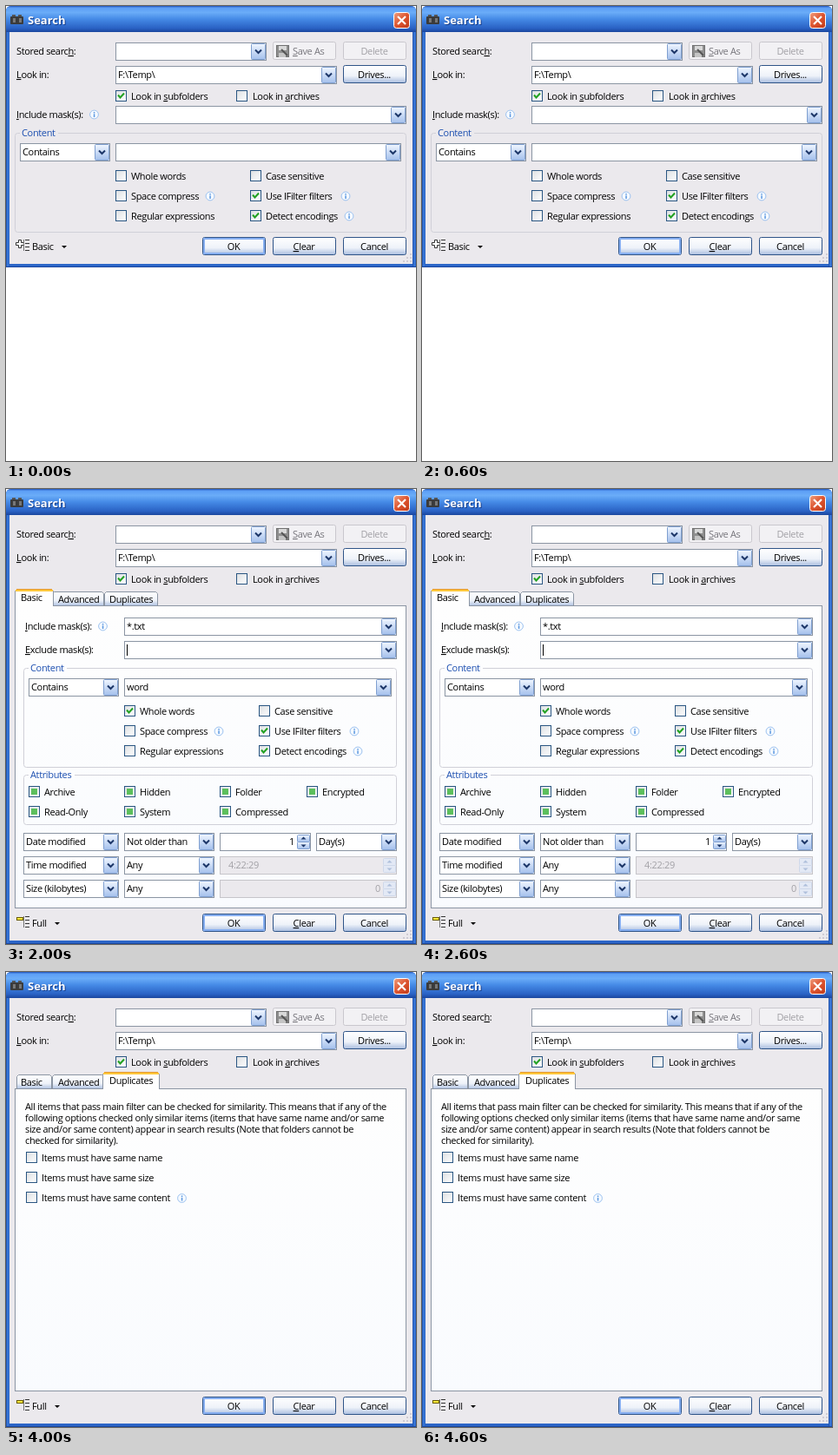
An HTML page for the animation above (5 s loop, 472x524 px).

```html
<!DOCTYPE html>
<html lang="en">
<head>
<meta charset="utf-8">
<title>Search dialog</title>
<style>
html, body { margin: 0; width: 100%; height: 100%; overflow: hidden; background: #fff; }
svg { display: block; width: 472px; height: 524px; }
text { font: 11px "Open Sans", "Noto Sans", sans-serif; letter-spacing: -.35px; white-space: pre; }
.title { font-size: 13px; font-weight: 700; letter-spacing: 0; }
.u { text-decoration: underline; }
</style>
</head>
<body>
<svg viewBox="0 0 472 524">
  <defs>
    <linearGradient id="bar" x2="0" y2="1">
      <stop offset="0" stop-color="#1d50b8"/><stop offset=".07" stop-color="#5c9ef5"/>
      <stop offset=".25" stop-color="#6aacf8"/><stop offset=".5" stop-color="#458ae6"/>
      <stop offset=".85" stop-color="#2a62c4"/><stop offset="1" stop-color="#1a469e"/>
    </linearGradient>
    <linearGradient id="side"><stop stop-color="#1a469e"/><stop offset=".5" stop-color="#3f82e4"/><stop offset="1" stop-color="#2258b8"/></linearGradient>
    <linearGradient id="btn" x2="0" y2="1"><stop stop-color="#fff"/><stop offset=".6" stop-color="#eef2f9"/><stop offset="1" stop-color="#a9bddf"/></linearGradient>
    <linearGradient id="drop" x2="0" y2="1"><stop stop-color="#f0f6ff"/><stop offset="1" stop-color="#a4c0ec"/></linearGradient>
    <linearGradient id="box" x2="1" y2="1"><stop stop-color="#dcdfe2"/><stop offset="1" stop-color="#fff"/></linearGradient>
    <linearGradient id="red" x2="1" y2="1"><stop stop-color="#f0a080"/><stop offset=".5" stop-color="#dd5530"/><stop offset="1" stop-color="#c03a18"/></linearGradient>
    <linearGradient id="page" x2="0" y2="1"><stop stop-color="#fefefe"/><stop offset="1" stop-color="#f9fbfe"/></linearGradient>
  </defs>
  <g id="stage"></g>
</svg>
<script>
const INK = '#000', GREY = '#a2a1a6', EDGE = '#8b95a3', FACE = '#ebe9ed';

// Basic shapes
const rect = (x, y, w, h, fill, line, rx = 0) => line
  ? `<rect x="${x + .5}" y="${y + .5}" width="${w - 1}" height="${h - 1}" fill="${fill}" stroke="${line}" rx="${rx}"/>`
  : `<rect x="${x}" y="${y}" width="${w}" height="${h}" fill="${fill}" rx="${rx}"/>`;
const path = (d, line, width = 1, fill = 'none') =>
  `<path d="${d}" stroke="${line}" stroke-width="${width}" fill="${fill}"/>`;
// An underscore marks the access key
const text = (x, y, s, fill = INK, anchor = 'start', cls = '') =>
  `<text x="${x}" y="${y}" fill="${fill}" text-anchor="${anchor}" class="${cls}">${s.replace(/_(.)/, '<tspan class="u">$1</tspan>')}</text>`;

// Controls
const arrow = (x, y) => path(`M${x} ${y}h6l-3 3z`, 'none', 0, INK);

function combo(x, y, right, label = '', off = false) {
  const bx = right - 18, ink = off ? '#b9c4d8' : '#1c3668';
  return rect(x, y, right - x, 21, off ? FACE : '#fff', off ? '#c6c5ca' : EDGE) +
    text(x + 3, y + 14, label, off ? GREY : INK) +
    rect(bx, y + 1, 17, 19, off ? '#e3e7f0' : 'url(#drop)', off ? '#d0d6e2' : '#7f9fd0', 1) +
    path(`M${bx + 5} ${y + 8.5}l3.5 3.5l3.5 -3.5`, ink, 2);
}

function spin(x, y, right, label, off, left) {
  const bx = right - 16, ink = off ? '#afc0dc' : '#1c3668';
  const half = (dy, d) => rect(bx, y + dy, 15, 9, off ? '#e3e9f5' : 'url(#drop)', off ? '#ced8ea' : '#7f9fd0', 1) +
    path(`M${bx + 4.5} ${y + dy + 4.5 + d}h6l-3 ${-3 * d}z`, 'none', 0, ink);
  return rect(x, y, right - x, 21, off ? FACE : '#fff', off ? '#c6c5ca' : EDGE) +
    text(left ? x + 10 : right - 19, y + 14, label, off ? GREY : INK, left ? 'start' : 'end') +
    half(2, 1) + half(10, -1);
}

function check(x, y, label, mark, gap = 18) {
  const marks = {
    on: path(`M${x + 3} ${y + 5.5}l2.5 3l4.5 -5`, '#21a121', 2),
    some: rect(x + 3, y + 3, 7, 7, '#5cbf5c')
  };
  return rect(x, y, 13, 13, 'url(#box)', '#2a5682') + (marks[mark] || '') + text(x + gap, y + 11, label);
}

function button(x, y, label, kind) {
  const off = kind === 'off';
  return rect(x, y, 73, 21, off ? '#f2f1f4' : 'url(#btn)', off ? '#c9c7cd' : '#2f5488', 2) +
    (kind === 'main' ? `<rect x="${x + 2}" y="${y + 2}" width="69" height="17" fill="none" stroke="#86aef0" stroke-width="2"/>` : '') +
    text(x + 36, y + 15, label, off ? GREY : INK, 'middle');
}

const info = (x, y) => `<circle cx="${x}" cy="${y}" r="4.9" fill="#f6faff" stroke="#9cc2f0"/>` +
  rect(x - .7, y - 3, 1.5, 1.5, '#5b98e0') + rect(x - .7, y - .7, 1.5, 3.7, '#5b98e0');

const group = (y, x, right, h, label, w, bg) => rect(x, y, right - x, h, 'none', '#d0d0d8', 3) +
  rect(x + 6, y - 4, w, 9, bg) + text(x + 8, y + 4, label, '#1c4fb0');

const contentChecks = (x, y, whole) =>
  check(x, y, 'Whole words', whole) + check(x + 155, y, 'Case sensitive') +
  check(x, y + 23, 'Space compress') + check(x + 155, y + 23, 'Use IFilter filters', 'on') +
  check(x, y + 46, 'Regular expressions') + check(x + 155, y + 46, 'Detect encodings', 'on');

function content(x, y, right, filled, bg) {
  return group(y, x, right, 115, 'Content', 44, bg) +
    combo(x + 6, y + 12, x + 110, 'Contains') + combo(x + 116, y + 12, right - 6, filled ? 'word' : '') +
    contentChecks(x + 116, y + 43, filled && 'on') +
    info(x + 225, y + 73) + info(x + 381, y + 73) + info(x + 385, y + 96);
}

const include = (x, y, right, label) => text(x + 2, y + 14, '_Include mask(s):') +
  info(x + 91.5, y + 10) + combo(x + 116, y, right, label);

// Masks, content, attributes and date rows, shared by the larger layouts
function filters(x, y, right, filled) {
  const bg = filled ? '#fdfdfe' : FACE;
  const names = [['Archive', 0, 0], ['Hidden', 110, 0], ['Folder', 220, 0], ['Encrypted', 320, 0],
    ['Read-Only', 0, 23], ['System', 110, 23], ['Compressed', 220, 23]];
  const rows = ['Date modified', 'Time modified', 'Size (kilobytes)'].map((s, i) =>
    combo(x, y + 248 + 27 * i, x + 110, s) +
    combo(x + 116, y + 248 + 27 * i, x + 220, filled && !i ? 'Not older than' : 'Any'));
  return include(x, y, right, filled ? '*.txt' : '') +
    text(x + 2, y + 41, '_Exclude mask(s):') + combo(x + 116, y + 27, right) +
    (filled ? rect(x + 119, y + 31, 1, 13, INK) : '') +
    content(x, y + 58, right, filled, bg) +
    group(y + 181, x, right, 58, 'Attributes', 53, bg) +
    names.map(([s, dx, dy]) => check(x + 6 + dx, y + 194 + dy, s, 'some')).join('') +
    rows.join('') +
    (filled ? spin(x + 226, y + 248, 351, '1') + combo(357, y + 248, right, 'Day(s)')
      : combo(x + 226, y + 248, right, '24.04.2009', true)) +
    spin(x + 226, y + 275, right, filled ? '4:22:29' : '4:25:27', true, true) +
    spin(x + 226, y + 302, right, '0', true);
}

// Window parts
function frame(h) {
  return path(`M0 ${h}V6Q0 0 6 0H466Q472 0 472 6V${h}z`, 'none', 0, '#2c66c8') +
    path('M0 30V6Q0 0 6 0H466Q472 0 472 6V30z', 'none', 0, 'url(#bar)') +
    rect(0, 30, 4, h - 30, 'url(#side)') + rect(468, 30, 4, h - 30, 'url(#side)') +
    rect(0, h - 1, 472, 1, '#1a469e') + rect(4, 30, 464, h - 34, FACE) +
    rect(7, 10, 4, 4, '#555') + rect(14, 10, 4, 4, '#555') +
    rect(5, 12, 15, 9, '#3b3b3b', '', 1) + rect(8, 14, 3, 5, '#777') + rect(15, 14, 3, 5, '#777') +
    text(26, 22, 'Search', '#173f8c', 'start', 'title') + text(25, 21, 'Search', '#fff', 'start', 'title') +
    rect(446, 7, 19, 19, 'url(#red)', '#fff', 3) +
    path('M451 12l9 9M460 12l-9 9', '#fff', 2.2) +
    [[0, 0], [4, 0], [8, 0], [4, -4], [8, -4], [8, -8]].map(([a, b]) =>
      rect(457 + a, h - 8 + b, 2, 2, '#cfccd4')).join('');
}

const header = () => text(12, 56, 'Stored searc_h:') + combo(126, 42, 300) +
  rect(307, 41, 73, 21, '#f2f1f4', '#c9c7cd', 2) +
  rect(311, 45, 15, 14, '#8f8f8f', '#707070') + rect(314, 46, 9, 5, '#d9d9d9') + rect(314, 54, 8, 5, '#c4c4c4') +
  path('M317 50l7 7', '#555', 2) + text(330, 56, '_Save As', '#77767c') +
  button(388, 41, 'Delete', 'off') +
  text(12, 83, '_Look in:') + combo(126, 69, 381, 'F:\\Temp\\') +
  button(388, 68, 'Drives...') +
  check(126, 97, 'Look in _subfolders', 'on') + check(265, 97, 'Look in _archives', '', 19);

function footer(y, mode, arrowX) {
  const full = mode === 'Full', fill = mode === 'Basic' ? '#fff' : '#ffe83c';
  const icon = full
    ? rect(12, y + 4, 8, 4, '#ffe83c', '#6a5c00')
    : path(`M14.5 ${y + 3.5}h3v3h3v3h-3v3h-3v-3h-3v-3h3z`, '#333', 1, fill);
  const lines = [3, 7, 11, 15].map(d => rect(22, y + d, 5, 1, '#333')).join('');
  return icon + rect(20, y + 3, 1, 13, '#777') + lines +
    text(30, y + 15, mode) + arrow(arrowX, y + 10) +
    button(226, y, 'OK', 'main') + button(307, y, '_Clear') + button(388, y, 'Cancel');
}

function tabs(active) {
  const list = [['Basic', 12, 53, 17], ['Advanced', 53, 113, 60], ['Duplicates', 113, 175, 119]];
  const draw = ([label, x, right, tx], i) => {
    const on = i === active, y = on ? 115 : 118, a = on ? x - 2 : x, b = on ? right + 2 : right;
    return path(`M${a + .5} 135V${y + 2.5}l2 -2H${b - 2.5}l2 2V135`, EDGE, 1, on ? '#fefefe' : 'url(#btn)') +
      (on ? rect(a + 1, y + 1, b - a - 2, 2, '#ffc73c') + rect(a + 2, y, b - a - 4, 1, '#e5972d') +
        rect(a + 1, 133, b - a - 2, 3, '#fefefe') : '') +
      text(tx, on ? 129 : 131, label);
  };
  return list.map((t, i) => i === active ? '' : draw(t, i)).join('') +
    rect(10, 134, 451, 349, 'url(#page)', EDGE) + draw(list[active], active);
}

const tag = (x, y, add) =>
  path(`M${x + 1} ${y + 2}l7 -1l8 8l-6 7l-9 -8z`, '#8ab4dc', 1, '#d6eafa') +
  `<circle cx="${x + 4.5}" cy="${y + 4.5}" r="1.5" fill="#fff" stroke="#7094bc"/>` +
  `<circle cx="${x + 13}" cy="${y + 13}" r="4.5" fill="${add ? '#5cb040' : '#f07038'}"/>` +
  path(`M${x + 10.5} ${y + 13}h5` + (add ? 'm-2.5 -2.5v5' : ''), '#fff', 1.6);

function conditions() {
  const words = [
    [26, 167, 'Match items where'], [124, 167, 'all'], [152, 167, 'of the following apply'],
    [58, 195, 'Date modified'], [144, 195, 'is'], [162, 195, 'not older than'], [310, 195, 'day(s)'],
    [58, 220, 'Name'], [93, 220, 'matches'], [151, 220, 'mask:'], [187, 219, '*.txt'],
    [58, 245, 'Item'], [89, 245, 'contains'], [147, 245, 'text:'], [178, 244, 'word'], [46, 345, 'Add New Condition']];
  const arrows = [[141, 162], [134, 190], [233, 190], [346, 190], [142, 215], [139, 240], [143, 340]];
  return rect(18, 146, 435, 326, '#fff', '#9aa3ae') +
    [181, 206, 231].map(y => tag(28, y + 1) + rect(52, y + 2, 1, 17, '#c5c5cc')).join('') +
    tag(27, 332, true) +
    rect(244, 181, 60, 20, '#fff', INK) + rect(184, 206, 151, 20, '#fff', INK) + rect(176, 231, 151, 20, '#fff', INK) +
    words.map(w => text(...w)).join('') + text(301, 195, '1', INK, 'end') +
    arrows.map(a => arrow(...a)).join('') + contentChecks(52, 261, 'on');
}

function duplicates() {
  const lines = [
    'All items that pass main filter can be checked for similarity. This means that if any of the',
    'following options checked only similar items (items that have same name and/or same',
    'size and/or same content) appear in search results (Note that folders cannot be',
    'checked for similarity).'];
  return lines.map((s, i) => text(22, 159 + 13 * i, s)).join('') +
    ['name', 'size', 'content'].map((s, i) => check(23, 207 + 23 * i, 'Items must have same ' + s)).join('') +
    info(202.5, 260.5);
}

const full = (active, body) => frame(524) + header() + tabs(active) + body + footer(489, 'Full', 56);
const scenes = [
  frame(301) + header() + include(10, 115, 461) + content(10, 146, 461, false, FACE) + footer(266, 'Basic', 64),
  frame(480) + header() + filters(10, 115, 461, false) + footer(445, 'Advanced', 88),
  full(0, filters(20, 148, 450, true)),
  full(1, conditions()),
  full(2, duplicates())
];

const stage = document.getElementById('stage');
let shown = -1;
function tick() {
  const scene = Math.floor(performance.now() / 1000) % scenes.length;
  if (scene !== shown) stage.innerHTML = scenes[shown = scene];
  requestAnimationFrame(tick);
}
tick();
</script>
</body>
</html>
```
